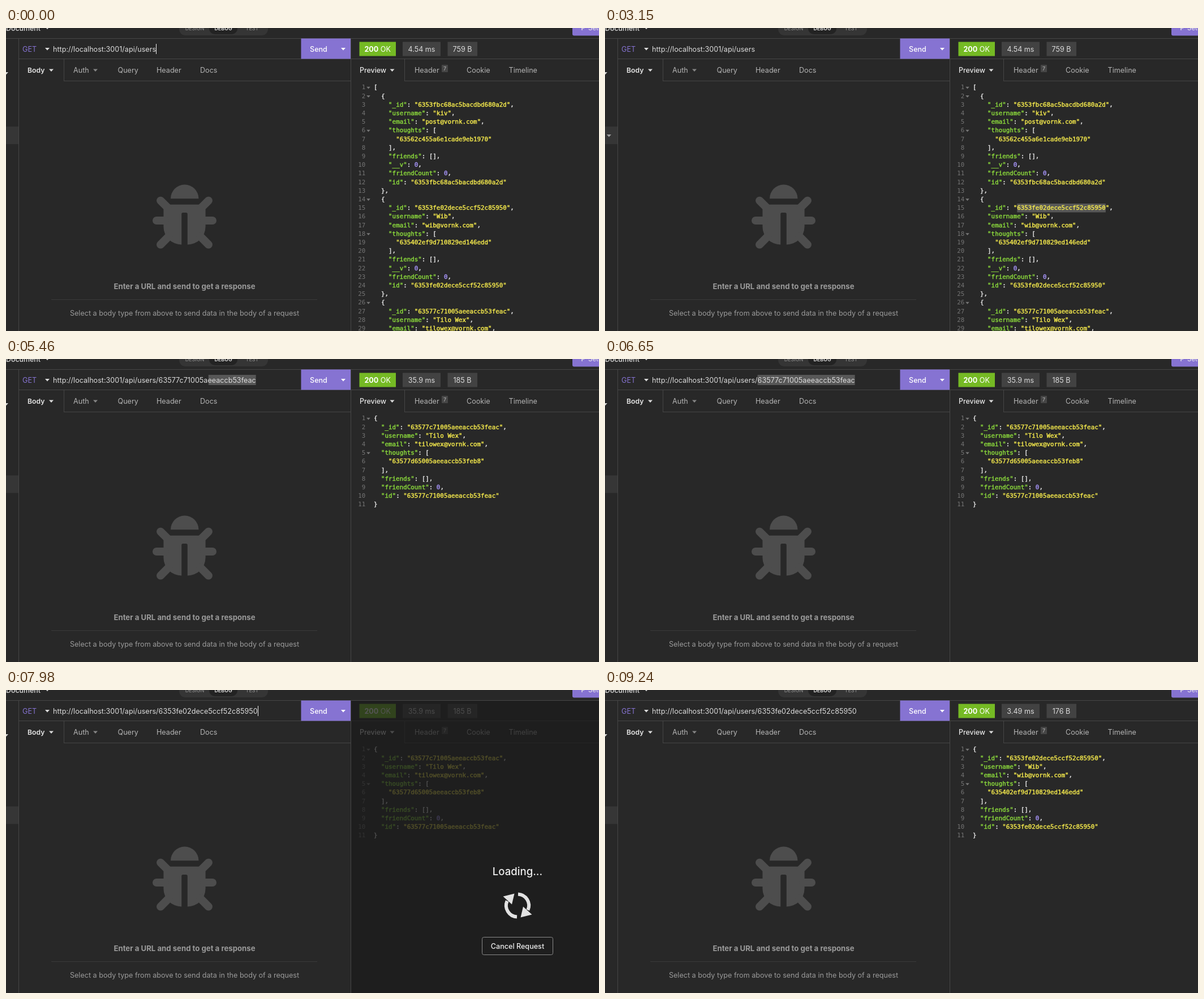
These frames come from a looping animation (1048x535 px, 9.52 s). An HTML page:

```html
<!DOCTYPE html>
<html lang="en">
<head>
<meta charset="utf-8">
<title>API client</title>
<style>
  html, body { margin: 0; width: 100%; height: 100%; overflow: hidden; background: #282828; }
  svg { display: block; }
  text { font: 12.6px Inter, "Open Sans", sans-serif; fill: #dcdcdc; white-space: pre; }
  .mono { font: 10.84px "DejaVu Sans Mono", monospace; stroke-width: .45; }
  .key { fill: #8bd93c; stroke: #8bd93c; }
  .str { fill: #f3e84c; stroke: #f3e84c; }
  .num { fill: #a492f5; stroke: #a492f5; }
  .pun { fill: #e4e4e4; stroke: #e4e4e4; }
  .line { fill: #757575; }
</style>
</head>
<body>
<svg id="stage" width="1048" height="535" viewBox="0 0 1048 535"></svg>
<script>
const LOOP = 9520, TICK = 70;
const BG = '#282828', EDGE = '#464646', PURPLE = '#8673d2', DIM = '#9a9a9a', SELECT = '#575757';
const CHAR = 10.84 * 0.602, JSON_X = 650, PITCH = 15.2;
const stage = document.getElementById('stage');

function add(parent, tag, attrs = {}, text) {
  const node = document.createElementNS('http://www.w3.org/2000/svg', tag);
  for (const name in attrs) node.setAttribute(name, attrs[name]);
  if (text !== undefined) node.textContent = text;
  parent.append(node);
  return node;
}
const rect = (x, y, width, height, fill, more, parent = stage) =>
  add(parent, 'rect', { x, y, width, height, fill, ...more });
const label = (x, y, text, style = '', anchor = 'start', parent = stage) =>
  add(parent, 'text', { x, y, style, 'text-anchor': anchor }, text);
const arrow = (x, y, fill = '#dcdcdc', w = 4, parent = stage) =>
  add(parent, 'path', { d: `M${x - w} ${y - w / 2}h${2 * w}l${-w} ${w * 1.15}z`, fill });
const show = (node, on) => node.setAttribute('visibility', on ? 'visible' : 'hidden');

// Data
const user = (id, username, email, thought, extra = {}) => ({
  _id: id, username, email, thoughts: [thought], friends: [], ...extra, friendCount: 0, id
});
const people = [
  ['6353fbc68ac5bacdbd680a2d', 'kiv', 'post@vornk.com', '63562c455a6e1cade9eb1970'],
  ['6353fe02dece5ccf52c85950', 'Wib', 'wib@vornk.com', '635402ef9d710829ed146edd'],
  ['63577c71005aeeaccb53feac', 'Tilo Wex', 'tilowex@vornk.com', '63577d65005aeeaccb53feb8']
];
const base = 'http://localhost:3001/api/users';

// Sidebar and top bar
rect(0, 0, 1048, 535, BG);
const activeRow = rect(0, 174, 22, 31, '#363636');
const rowArrow = add(stage, 'g');
arrow(7, 190, '#a0a0a0', 4, rowArrow);
arrow(0, 80);
label(0, 5, 'Document', 'font-weight:500;font-size:12.4px');
arrow(73, 0, '#dcdcdc', 3.5);
rect(306, -12, 157, 25, '#353535', { rx: 11 });
rect(359, -10, 50, 21, '#232323', { rx: 10 });
[[333.5, 'DESIGN', '#858585', 500], [384, 'DEBUG', '#e0e0e0', 600], [435, 'TEST', '#858585', 500]]
  .forEach(([x, name, color, weight]) =>
    label(x, 4, name, `font-size:9px;font-weight:${weight};fill:${color}`, 'middle'));
rect(1001, -10, 60, 23.5, PURPLE, { rx: 3 });
add(stage, 'path', { d: 'M1018 4v-6m0 2h4', stroke: '#e8e8e8', 'stroke-width': 1.4, fill: 'none' });
label(1029, 4, 'Setup', 'fill:#eee;font-size:11.5px');

// Frame lines
[[0, 18, 1048, 1], [22, 18, 1, 517], [609, 18, 1, 517], [22, 54, 1026, 1],
 [102, 55, 1, 39], [102, 93, 507, 1], [704, 55, 1, 39], [704, 93, 344, 1]]
  .forEach(([x, y, w, h]) => rect(x, y, w, h, EDGE));

// Request side
label(29, 41.5, 'GET', `fill:${PURPLE}`);
arrow(73, 37);
const urlSelect = rect(0, 28, 0, 18, SELECT);
const url = label(83, 41.5, base);
const caret = rect(0, 28, 1, 18, '#f0f0f0');
rect(521.5, 18.5, 87.5, 36, PURPLE);
label(537, 41.5, 'Send', 'fill:#fff;font-weight:500');
arrow(596, 37, '#fff');
label(38, 79, 'Body', 'font-weight:600;fill:#e6e6e6;font-size:12.2px');
arrow(80, 74.5);
label(119, 79, 'Auth', 'fill:#b4b4b4');
arrow(158, 74.5, '#858585');
label(197.5, 79, 'Query', 'fill:#b4b4b4');
label(266, 79, 'Header', 'fill:#b4b4b4');
label(343, 79, 'Docs', 'fill:#b4b4b4');

const bug = add(stage, 'g', { transform: 'translate(259 276.5) scale(.2207)', fill: '#4d4d4d' });
add(bug, 'path', { d: 'M145 112a112 112 0 0 1 224 0z' });
add(bug, 'path', {
  d: 'M88 160H424V336A144 144 0 0 1 280 480V236q0-12-12-12H244q-12 0-12 12V480A144 144 0 0 1 88 336z'
});
const legs = 'M32 288H100M64 128l56 56M64 480l64-64';
['', 'translate(512 0) scale(-1 1)'].forEach(transform => add(bug, 'path', {
  d: legs, transform, fill: 'none', stroke: '#4d4d4d', 'stroke-width': 64, 'stroke-linecap': 'round'
}));
label(315.5, 461, 'Enter a URL and send to get a response', `font-weight:700;font-size:13.2px;fill:${DIM}`, 'middle');
rect(80, 479, 470, 1, '#3a3a3a');
label(315.5, 508, 'Select a body type from above to send data in the body of a request', `fill:${DIM}`, 'middle');

// Response side
label(625, 79, 'Preview', 'font-weight:500;fill:#e6e6e6;font-size:12.4px');
arrow(682.5, 74.5);
label(722, 79, 'Header', 'fill:#b4b4b4');
rect(770, 65, 11, 13, '#464646', { rx: 1 });
label(775.5, 75, '7', 'font-size:9px;fill:#bbb', 'middle');
label(814, 79, 'Cookie', 'fill:#b4b4b4');
label(888.5, 79, 'Timeline', 'fill:#b4b4b4');
rect(624.5, 24.5, 64.5, 25, '#75ba24');
const status = label(656.7, 41.5, '', 'fill:#fff', 'middle');
add(status, 'tspan', { 'font-weight': 700 }, '200');
add(status, 'tspan', {}, ' OK');
rect(701, 24.5, 67, 25, '#424242');
rect(780.5, 24.5, 52.5, 25, '#424242');
const jsonSelect = rect(0, 310, 0, 15.5, SELECT);

function response(time, size, data) {
  const group = add(stage, 'g');
  label(734.5, 41.5, time, '', 'middle', group);
  label(806.5, 41.5, size, '', 'middle', group);
  JSON.stringify(data, null, 2).split('\n').slice(0, 29).forEach((line, i) => {
    const y = 108.4 + i * PITCH;
    add(group, 'text', { x: 635.3, y, class: 'mono line', 'text-anchor': 'end' }, i + 1);
    if (/[{[]$/.test(line)) arrow(640.5, y - 3, '#777', 3.3, group);
    const indent = line.search(/\S/);
    const row = add(group, 'text', { x: JSON_X + indent * CHAR, y, class: 'mono' });
    for (const [part] of line.trim().matchAll(/"[^"]*"(?=:)|"[^"]*"|\d+|[^"\d]+/g)) {
      const isKey = part[0] === '"' && line.includes(part + ':');
      const kind = isKey ? 'key' : part[0] === '"' ? 'str' : /\d/.test(part) ? 'num' : 'pun';
      add(row, 'tspan', { class: kind }, part);
    }
  });
  return group;
}
const [, second, third] = people;
const views = [
  response('4.54 ms', '759 B', people.map(p => user(...p, { __v: 0 }))),
  response('35.9 ms', '185 B', user(...third)),
  response('3.49 ms', '176 B', user(...second))
];

// Loading cover
const cover = add(stage, 'g');
rect(610, 19, 438, 516, '#1b1b1b', { 'fill-opacity': 0.75 }, cover);
label(904, 326.5, 'Loading...', 'font-size:18.6px;font-weight:500;fill:#eee', 'middle', cover);
const spinner = add(cover, 'g');
[0, 180].forEach(turn => {
  const half = add(spinner, 'g', { transform: `rotate(${turn})` });
  add(half, 'path', { d: 'M-1 20A20 20 0 0 1-18.4-8', fill: 'none', stroke: '#e2e2e2', 'stroke-width': 6 });
  add(half, 'path', { d: 'M-25.5-16L-5.5-21L-10-2z', fill: '#e2e2e2' });
});
rect(841.5, 436.5, 125, 31, 'none', { rx: 3, stroke: '#8a8a8a' }, cover);
label(904, 457, 'Cancel Request', 'font-weight:500;fill:#eee', 'middle', cover);

// Motion
const ramp = (t, from, to) => Math.min(1, Math.max(0, (t - from) / (to - from)));
const ease = p => p * p * (3 - 2 * p);
const urls = [base, `${base}/${third[0]}`, `${base}/${second[0]}`];
const caretOn = [[0, 210], [630, 770], [4970, 5320], [6860, 7350], [7770, 8260], [8680, 9170]];

function place(box, x, width) {
  box.setAttribute('x', x);
  box.setAttribute('width', width);
}

function draw(t) {
  const request = t < 3850 ? 0 : t < 6860 ? 1 : 2;
  const shown = t < 3920 ? 0 : t < 8330 ? 1 : 2;
  if (url.textContent !== urls[request]) url.textContent = urls[request];
  views.forEach((view, i) => show(view, i === shown));

  const end = 83 + url.getComputedTextLength();
  caret.setAttribute('x', Math.round(end));
  show(caret, caretOn.some(([from, to]) => t >= from && t < to));

  const pick = 0.65 * ramp(t, 5250, 5530) + 0.35 * ramp(t, 5600, 5880);
  const idWidth = request === 1 ? end - 83 - url.getSubStringLength(0, base.length + 1) : 0;
  place(urlSelect, end - idWidth * pick, idWidth * pick);

  const chars = shown === 0 ? Math.round(24 * ease(ramp(t, 700, 1400))) : 0;
  place(jsonSelect, JSON_X + 12 * CHAR, chars * CHAR);

  activeRow.setAttribute('y', request ? 205.5 : 174);
  show(rowArrow, t >= 3150 && t < 4060);
  rowArrow.setAttribute('transform', `translate(0 ${t < 3430 ? 0 : 31})`);

  const loading = t >= 7350 && t < 8330;
  show(cover, loading);
  cover.setAttribute('opacity', ramp(t, 7350, 7840));
  spinner.setAttribute('transform', `translate(904 380.5) rotate(${(t - 7980) * 0.18})`);
}

const start = performance.now();
function tick(now) {
  const t = Math.max(0, now - start) % LOOP;
  draw(Math.floor(t / TICK) * TICK);
  requestAnimationFrame(tick);
}
draw(0);
requestAnimationFrame(tick);
</script>
</body>
</html>
```
